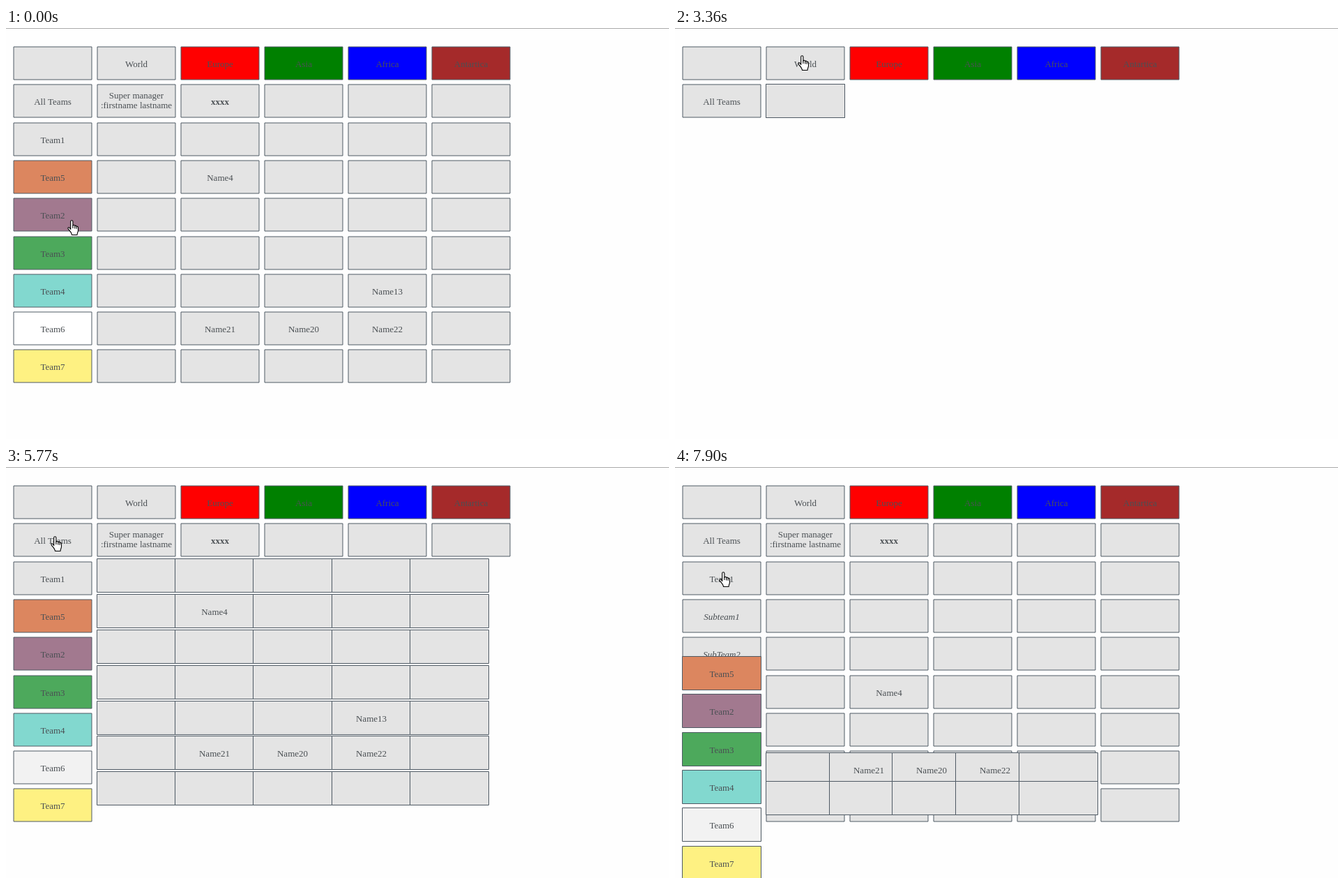
These frames come from a looping animation (951x589 px, 8 s). An HTML page with a canvas:

```html
<!DOCTYPE html>
<html lang="en">
<head>
<meta charset="utf-8">
<title>Team grid</title>
<style>
  html, body { margin: 0; width: 951px; height: 589px; overflow: hidden; background: #fefefe; }
  canvas { display: block; }
</style>
</head>
<body>
<canvas id="stage" width="951" height="589"></canvas>
<script>
const ctx = document.getElementById('stage').getContext('2d');
const LOOP = 8000;
const GREY = '#e4e4e4', INK = '#4b5054', LINE = '#4f5a64';
const FONT = '13px "Liberation Serif", "Times New Roman", serif';

const regions = [
  ['World', GREY], ['Europe', '#ff0000'], ['Asia', '#008000'],
  ['Africa', '#0000ff'], ['Antartica', '#a52a2a']
];
const fills = {
  Team5: '#dc865f', Team2: '#a2798f', Team3: '#4da95c',
  Team4: '#82d8cf', Team6: '#ffffff', Team7: '#fef182'
};
const people = {
  'All Teams': ['Super manager\n:firstname lastname', 'xxxx'],
  Team5: ['', 'Name4'],
  Team4: ['', '', '', 'Name13'],
  Team6: ['', 'Name21', 'Name20', 'Name22']
};
const teams = ['Team5', 'Team2', 'Team3', 'Team4', 'Team6', 'Team7'];
const subteams = ['Subteam1', 'SubTeam2'];

const colX = c => 11 + 119.9 * c;
const rowY = r => 27 + 54.3 * r;

// Pointer moves: begin, end, steps, target x, target y
const moves = [
  [140, 690, 5, 77, 110],
  [1820, 2250, 4, 176, 39],
  [3900, 4290, 4, 65, 80],
  [4410, 4690, 3, 64, 99],
  [6410, 6800, 4, 63, 149],
  [7050, 7051, 1, 63, 150]
];
// Expansions: click time, first and last repaint, repaint count
const columnsIn = [3300, 3360, 4290, 8];
const rowsIn = [5017, 5080, 6040, 8];
const subsIn = [7293, 7330, 7900, 5];

const hand = new Path2D('M4.7 13.5V2.2C4.7 .2 7.9 .2 7.9 2.2V8.2C8.4 7 10.6 7.2 10.8 8.6' +
  'C11.4 7.8 13 8.2 13.2 9.5C14 9 15.5 9.5 15.5 11V15C15.5 17.5 14 18.5 14 21.5H6.5' +
  'C6.5 19 4 16.5 1.2 12.8C.2 11.2 2 10 3.2 11.4Z');
const knuckles = new Path2D('M7.9 8V12M10.8 8.6V12.4M13.2 9.5V12.8');

function stepOf(t, begin, end, count) {
  if (t < begin) return 0;
  if (count < 2 || t >= end) return count;
  return 1 + Math.floor((t - begin) / (end - begin) * (count - 1) + 1e-6);
}

function cubicInOut(u) {
  u = Math.min(1, Math.max(0, u));
  return u < 0.5 ? 4 * u ** 3 : 1 - 4 * (1 - u) ** 3;
}

function progress(t, [click, begin, end, count]) {
  const k = stepOf(t, begin, end, count);
  if (!k) return 0;
  const p = cubicInOut((begin + (k - 1) * (end - begin) / (count - 1) - click) / 1000);
  return p > 0.999 ? 1 : p;
}

function box(x, y, fill, text = '', moving = false, style = '') {
  const shift = moving ? 0.5 : 0, grow = moving ? 1 : 0;
  x = Math.round(x) - shift;
  y = Math.round(y) - shift;
  ctx.fillStyle = fill;
  ctx.strokeStyle = LINE;
  ctx.lineWidth = 1;
  ctx.beginPath();
  ctx.rect(x, y, 112 + grow, 47 + grow);
  ctx.fill();
  ctx.stroke();
  if (!text) return;
  ctx.font = style + ' ' + FONT;
  ctx.fillStyle = INK;
  const lines = text.split('\n');
  lines.forEach((line, i) =>
    ctx.fillText(line, x + 56 + shift, y + 29 + shift + (lines.length > 1 ? 14 * i - 9 : 0)));
}

function drawHeaders(narrow) {
  box(colX(0), rowY(0), GREY);
  regions.slice(0, narrow ? 1 : 5).forEach(([name, fill], c) =>
    box(colX(c + 1), rowY(0), fill, name));
}

function drawLabels(rows, t, subP) {
  const split = rows.includes(subteams[0]);
  rows.forEach((name, i) => {
    const sub = subteams.includes(name);
    const slides = split && teams.includes(name) && subP < 1;
    const r = slides ? i - 2 + 2 * subP : i;
    const fill = name === 'Team6' && t > 970 ? '#f2f2f2' : fills[name] || GREY;
    box(colX(0), rowY(r + 1), fill, name, slides, sub ? 'italic' : '');
  });
}

// Entering cells fly out of the first data cell.
function drawCells(rows, count, entering, p) {
  const late = [];
  const put = (r, c, k) => {
    const text = (people[rows[r]] || [])[c] || '';
    box(colX(1) + 119.9 * c * k, rowY(1) + 54.3 * r * k, GREY, text, k < 1,
      text === 'xxxx' ? 'bold' : '');
  };
  rows.forEach((_, r) => {
    for (let c = 0; c < count; c++) {
      if (p < 1 && entering(r, c)) late.push([r, c]);
      else put(r, c, 1);
    }
  });
  late.forEach(([r, c]) => put(r, c, p));
}

function drawPointer(t) {
  let x = 88, y = 275;
  for (const [begin, end, count, tx, ty] of moves) {
    const u = stepOf(t, begin, end, count) / count;
    const k = u * u * (3 - 2 * u);
    x += (tx - x) * k;
    y += (ty - y) * k;
  }
  ctx.save();
  ctx.translate(Math.round(x), Math.round(y));
  ctx.fillStyle = '#fff';
  ctx.strokeStyle = '#000';
  ctx.lineWidth = 1.1;
  ctx.lineJoin = 'round';
  ctx.fill(hand);
  ctx.stroke(hand);
  ctx.stroke(knuckles);
  ctx.restore();
}

function draw(t) {
  ctx.fillStyle = '#fefefe';
  ctx.fillRect(0, 0, 951, 589);
  ctx.fillStyle = '#a9a9a9';
  ctx.fillRect(0, 0, 951, 1);
  ctx.textAlign = 'center';

  const closed = t >= 970 && t < rowsIn[1];
  const narrow = t >= 2640 && t < columnsIn[1];
  const split = t >= subsIn[1];
  const rows = ['All Teams'];
  if (!closed) rows.push('Team1', ...(split ? subteams : []), ...teams);

  let entering = () => false, p = 1;
  if (split) {
    p = progress(t, subsIn);
    entering = r => r > 7;
  } else if (t >= rowsIn[1]) {
    p = progress(t, rowsIn);
    entering = r => r > 0;
  } else if (t >= columnsIn[1]) {
    p = progress(t, columnsIn);
    entering = (r, c) => c > 0;
  }

  drawHeaders(narrow);
  drawLabels(rows, t, p);
  drawCells(rows, narrow ? 1 : 5, entering, p);
  drawPointer(t);
}

function tick() {
  draw(performance.now() % LOOP);
  requestAnimationFrame(tick);
}
tick();
</script>
</body>
</html>
```
